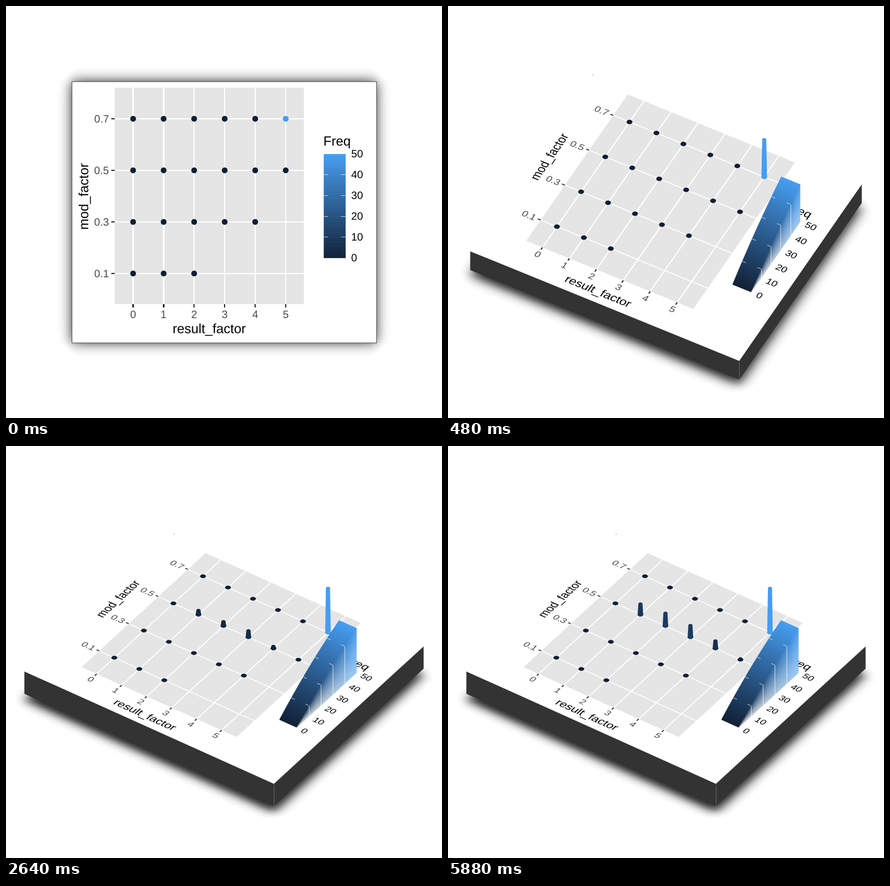
Animation of 770 by 727 pixels, one loop 6000 ms. Source, as a matplotlib script:

```python
import numpy as np
import matplotlib.pyplot as plt
from matplotlib.animation import FuncAnimation
from matplotlib.collections import PolyCollection
from matplotlib.patches import Ellipse, PathPatch, Polygon
from matplotlib.textpath import TextPath
from matplotlib.transforms import Affine2D

W, H, DPI = 770, 727, 100
CX, CY = W / 2, H / 2
FRAMES, INTERVAL, TILT_STEPS = 50, 120, 5

LEFT, RIGHT, TOP, BOTTOM = 116, 654, 133, 594      # board, seen from above
SURFACE, THICKNESS, PEAK = -15.8, 51.5, 102.5
BAR_L, BAR_R, BAR_T, BAR_B = 561, 598.5, 260.5, 444  # legend ramp
LOW, HIGH = np.array([15, 30, 51]) / 255, np.array([69, 157, 242]) / 255
GRAY, INK, WALL = "#484848", "black", "#333333"

COLUMNS = 224.5 + 53.9 * np.arange(6)
ROWS = {"0.7": 199, "0.5": 290, "0.3": 381, "0.1": 472}
DOTS_PER_ROW = {"0.7": 6, "0.5": 6, "0.3": 5, "0.1": 3}
GROWTH_STEPS = (5, 22, 31, 49)
GROWTH = {1: (0, 4, 5, 10), 2: (0, 4, 7, 12), 3: (0, 6, 6, 11),
          4: (0, 2, 6, 7), 5: (0, 0, 1, 1)}

fig = plt.figure(figsize=(W / DPI, H / DPI), dpi=DPI, facecolor="white")
ax = fig.add_axes([0, 0, 1, 1])
shadows = {}


def px(width):
    return width * 72 / DPI


def shade(f):
    return LOW + (HIGH - LOW) * np.asarray(f)[..., None]


def height(f):
    return PEAK * (f + 0.28 * f * (1 - f))


class Camera:
    """Orthographic view of the board, turned by theta and tipped by phi."""

    def __init__(self, step):
        self.step = step
        self.theta = 7 * step
        phi = np.radians(90 - 10 * step)
        self.sin, self.cos = np.sin(phi), np.cos(phi)

    def plane(self, z=0):
        return (Affine2D().translate(-CX, -CY).rotate_deg(self.theta)
                .scale(1, self.sin)
                .translate(CX, CY - (SURFACE + z) * self.cos))

    def project(self, x, y, z=0):
        x, y, z = np.broadcast_arrays(x, y, z)
        flat = self.plane().transform(np.column_stack([x.ravel(), y.ravel()]))
        flat[:, 1] -= z.ravel() * self.cos
        return flat.reshape(x.shape + (2,))


def polygon(points, color, **style):
    ax.add_patch(Polygon(points, facecolor=color, **{"lw": 0, **style}))


def rect(cam, x0, y0, x1, y1, color, **style):
    polygon(cam.project([x0, x1, x1, x0], [y0, y0, y1, y1]), color, **style)


def label(cam, x, y, text, size, color, align="center", turn=0):
    path = TextPath((0, 0), text, size=size,
                    prop={"family": "Liberation Sans"})
    box = path.get_extents()
    shift = {"left": 0, "center": (box.x0 + box.x1) / 2,
             "right": box.x1}[align]
    place = (Affine2D().translate(-shift, 0).scale(1, -1)
             .rotate_deg(-turn).translate(x, y))
    ax.add_patch(PathPatch(path.transformed(place + cam.plane()),
                           facecolor=color, lw=0))


def shadow(cam):
    if cam.step not in shadows:
        gx, gy = np.meshgrid(np.arange(W) + 0.5, np.arange(H) + 0.5)
        back = cam.plane(-THICKNESS - 15).inverted()
        u, v = np.abs(back.transform(np.column_stack([gx.ravel(), gy.ravel()]))
                      - (CX, CY)).T
        soft = lambda d: 1 / (1 + np.exp(np.clip(d, -60, 60) / 6.8))
        alpha = 0.92 * soft(u - (RIGHT - LEFT) / 2) * soft(v - (BOTTOM - TOP) / 2)
        image = np.zeros((H, W, 4))
        image[..., 3] = np.clip(alpha - 0.015, 0, 1).reshape(H, W)
        shadows[cam.step] = image
    ax.imshow(shadows[cam.step], extent=(0, W, H, 0), aspect="auto",
              interpolation="nearest", zorder=0)


def board(cam):
    if cam.step:
        for x, y in (([LEFT, RIGHT], [BOTTOM, BOTTOM]),
                     ([RIGHT, RIGHT], [BOTTOM, TOP])):
            upper = cam.project(x, y)
            lower = cam.project(x, y, -THICKNESS)
            polygon(np.vstack([upper, lower[::-1]]), WALL)
        edge = cam.project([RIGHT, RIGHT], [BOTTOM, BOTTOM], [0, -THICKNESS])
        polygon(edge, "none", edgecolor="#666666", lw=px(1))
        rect(cam, LEFT, TOP, RIGHT, BOTTOM, "white")
        ax.add_patch(Ellipse(cam.project(LEFT + 0.5, TOP + 0.5), 1.5, 1.2,
                             facecolor="#777777", lw=0))
    else:
        rect(cam, LEFT, TOP, RIGHT, BOTTOM, "white", edgecolor="#606060",
             lw=px(1.2), joinstyle="round")


def chart(cam):
    rect(cam, 192, 144.3, 526.3, 526.3, "#e5e5e5")
    for x in COLUMNS:
        rect(cam, x - 1.1, 144.3, x + 1.1, 526.3, "white")
    for y in ROWS.values():
        rect(cam, 192, y - 1.1, 526.3, y + 1.1, "white")
    for i, x in enumerate(COLUMNS):
        rect(cam, x - 1.1, 526.3, x + 1.1, 532, "#2c2c2c")
        label(cam, x, 550.6, str(i), 18.8, GRAY)
    for name, y in ROWS.items():
        rect(cam, 186.3, y - 1.1, 192, y + 1.1, "#2c2c2c")
        label(cam, 181, y + 6.6, name, 18.8, GRAY, "right")
    label(cam, 359.5, 577.3, "result_factor", 23.5, INK)
    label(cam, 145.2, 335.5, "mod_factor", 23.5, INK, turn=90)
    label(cam, 560.5, 246.3, "Freq", 23.5, INK, "left")
    for value in range(0, 51, 10):
        y = BAR_B + (BAR_T - BAR_B) * value / 50
        label(cam, 609.6, y + 6.6, str(value), 18.8, INK, "left")


def pillar(cam, x, y, value):
    color = shade(value / 50)
    base = cam.project(x, y)
    ax.add_patch(Ellipse(base, 10.2, 10.2 * cam.sin, facecolor=color, lw=0))
    if value and cam.step:
        tip = cam.project(x, y, height(value / 50))
        polygon([base + (-4.9, 0), tip + (-3.6, 0),
                 tip + (3.6, 0), base + (4.9, 0)], color)
        ax.add_patch(Ellipse(tip, 7.2, 7.2 * cam.sin, facecolor=color, lw=0))


def mesh(grid, colors):
    """Fill the cells between neighbouring points of a grid."""
    quads = np.stack([grid[:-1, :-1], grid[1:, :-1],
                      grid[1:, 1:], grid[:-1, 1:]], axis=2).reshape(-1, 4, 2)
    ax.add_collection(PolyCollection(quads, facecolors=colors.reshape(-1, 3),
                                     edgecolors="face", linewidths=0.4))


def ramp(cam):
    f = np.linspace(0, 1, 70)[:, None]
    mid = (f[:-1] + f[1:]) / 2
    y = BAR_B + (BAR_T - BAR_B) * f
    mesh(cam.project([[BAR_L, BAR_R]], y, height(f)), shade(mid))
    if cam.step:
        drop = np.linspace(0, 1, 17)[None, :]
        fade = ((drop[:, :-1] + drop[:, 1:]) / 2 * (0.85 - 0.4 * mid))[..., None]
        mesh(cam.project(BAR_R, y, height(f) * (1 - drop)),
             shade(mid) * (1 - fade) + fade)
    for t in (0.2, 0.4, 0.6, 0.8):
        ty, z = BAR_B + (BAR_T - BAR_B) * t, height(t)
        marks = [([BAR_L, BAR_L + 7.4], z), ([BAR_R - 7.4, BAR_R], z)]
        if cam.step:
            marks.append(([BAR_R, BAR_R], [z, 0]))
        for x, level in marks:
            ax.plot(*cam.project(x, ty, level).T, color="white", alpha=0.7,
                    lw=px(1), solid_capstyle="butt", zorder=1)


def draw(n):
    ax.cla()
    ax.axis("off")
    cam = Camera(min(n, TILT_STEPS))
    shadow(cam)
    board(cam)
    chart(cam)
    for name, y in ROWS.items():
        for i in range(DOTS_PER_ROW[name]):
            value = 50 if (name, i) == ("0.7", 5) else 0
            if name == "0.5" and i in GROWTH:
                value = int(np.interp(n, GROWTH_STEPS, GROWTH[i]) + 1e-6)
            pillar(cam, COLUMNS[i], y, value)
    ramp(cam)
    ax.set_xlim(0, W)
    ax.set_ylim(H, 0)
    return []


anim = FuncAnimation(fig, draw, frames=FRAMES, interval=INTERVAL,
                     init_func=lambda: [], repeat=True, repeat_delay=0)
plt.show()
```
